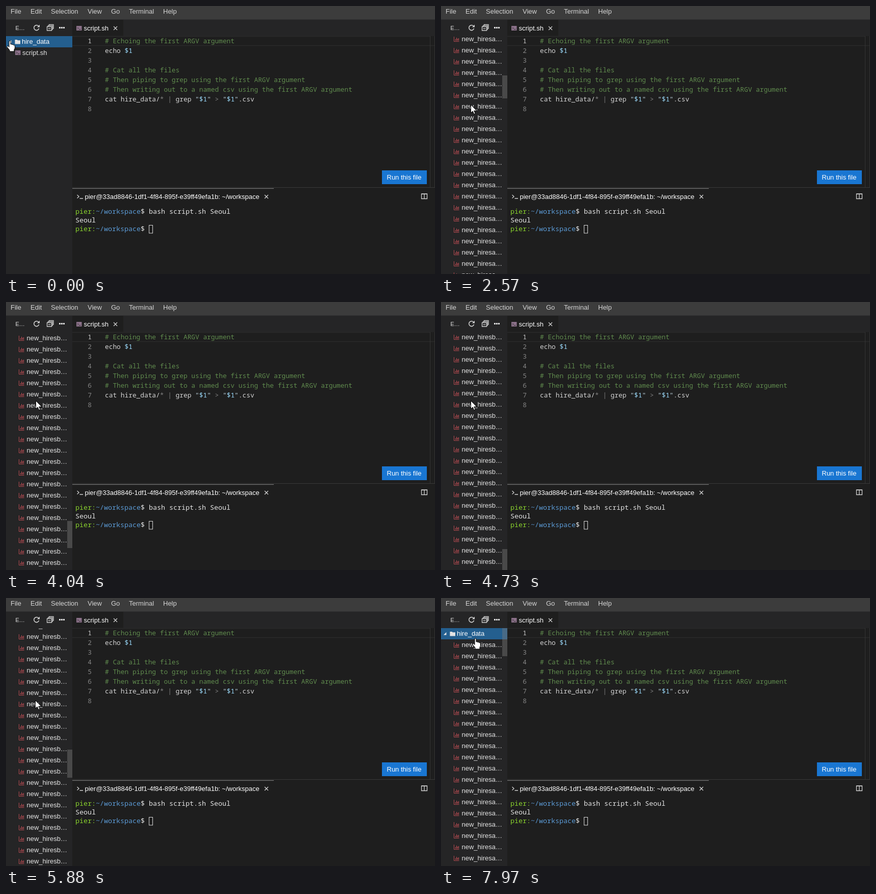
Write an HTML page that moves like this. It is 841x525 px and loops after 8 s.

```html
<!DOCTYPE html>
<html lang="en">
<head>
<meta charset="utf-8">
<title>Shell script workspace</title>
<style>
  html, body { margin: 0; width: 100%; height: 100%; overflow: hidden; background: #1e1e1e; }
  svg { display: block; }
  text { font: 13px "Liberation Sans", Arial, sans-serif; fill: #e4e4e4; white-space: pre;
         stroke: currentColor; stroke-width: 0; }
  .menu text { fill: #d4d4d4; }
  .code text { font: 12.83px "Noto Sans Mono", monospace; fill: #d4d4d4; }
  .code .num { fill: #858585; text-anchor: end; }
  .code .now { fill: #c6c6c6; }
  .code .note { fill: #608b4e; }
  .var { fill: #9cdcfe; }
  .str { fill: #b9cdd8; }
  .op { fill: #808080; }
  .term text { font: 13.333px "Noto Sans Mono", monospace; fill: #e5e5e5; }
  .user { fill: #8ad22e; }
  .path { fill: #5c9bd6; }
  .line { fill: none; stroke: #d0d0d0; stroke-width: 1.3; }
  .cursor { fill: #fff; stroke: #000; stroke-width: 1; stroke-linejoin: round; }
</style>
</head>
<body>
<svg width="841" height="525" viewBox="0 0 841 525">
  <defs>
    <clipPath id="pane"><rect y="59" width="130" height="466"/></clipPath>
    <g id="chart" fill="none" stroke="#b0494f">
      <path d="M.5 0V9.5H10.5"/>
      <path d="M3.5 5V8M5.5 2V8M7.5 4V8M9.5 3V8" stroke-width="1.2"/>
    </g>
    <g id="shell">
      <rect width="10.5" height="9" fill="#8b7189"/>
      <path d="M2 2.5L4 4.5 2 6.5M5 6.8H8.5" fill="none" stroke="#252526"/>
    </g>
    <path id="close" class="line" d="M-3.5 -3.5L3.5 3.5M3.5 -3.5L-3.5 3.5"/>
  </defs>

  <rect width="841" height="525" fill="#1e1e1e"/>
  <rect width="130" height="525" fill="#252526"/>
  <rect y="26" width="841" height="33" fill="#252526"/>
  <rect width="841" height="26.5" fill="#3c3c3c"/>
  <rect x="130" y="27" width="100" height="32" fill="#1e1e1e"/>

  <g class="menu">
    <text x="9" y="15">File</text><text x="48" y="15">Edit</text>
    <text x="88" y="15">Selection</text><text x="160" y="15">View</text>
    <text x="206" y="15">Go</text><text x="241" y="15">Terminal</text>
    <text x="308" y="15">Help</text>
  </g>

  <text x="18.5" y="47" style="font-size:11px">E…</text>
  <path class="line" style="stroke-width:1.6" d="M63.5 39.2A5 5 0 1 0 64.6 44"/>
  <path d="M61 41.5H66V36.5Z" fill="#d0d0d0"/>
  <path class="line" d="M80.5 40.5H89.5V48H80.5ZM82.5 40V38.3H91.2V46H90M84.5 38V36.3H93V44H92M82.5 44.3H87.5"/>
  <path d="M104 41h3v3h-3zM108 41h3v3h-3zM112 41h3v3h-3z" fill="#e0e0e0"/>

  <use href="#shell" x="138" y="39"/>
  <text x="152.5" y="48" style="fill:#fff">script.sh</text>
  <use href="#close" x="214.5" y="43.5"/>

  <path d="M130 59.5H831M130 77.5H841" stroke="#2a2a2a" stroke-width="1.5"/>
  <path d="M831.5 59V355M840.5 59V355" stroke="#343434"/>
  <g class="code" id="code"></g>
  <rect x="737" y="322" width="88" height="27" fill="#1976d2"/>
  <text x="746.5" y="340" style="fill:#fff">Run this file</text>

  <path d="M130 355.5H841" stroke="#393939"/>
  <path d="M130 357.5H525" stroke="#858585"/>
  <path class="line" d="M139.5 370L143 373.2 139.5 376.5M144.5 377H151"/>
  <text x="154.5" y="378" style="fill:#fff">pier@33ad8846-1df1-4f84-895f-e39ff49efa1b: ~/workspace</text>
  <use href="#close" x="510.5" y="373.5"/>
  <path class="line" d="M814.5 368H825.5V377.5H814.5ZM820 368V377.5M814.5 368.3H825.5"/>
  <g class="term">
    <text x="136" y="407"><tspan class="user">pier:</tspan><tspan class="path">~/workspace</tspan>$ bash script.sh Seoul</text>
    <text x="136" y="424">Seoul</text>
    <text x="136" y="441"><tspan class="user">pier:</tspan><tspan class="path">~/workspace</tspan>$</text>
    <rect x="280.5" y="429.5" width="7" height="15.5" fill="none" stroke="#d8d8d8"/>
  </g>

  <g clip-path="url(#pane)">
    <rect id="hover" width="130" height="22" fill="#2a2d2e"/>
    <g id="tree">
      <rect y="59" width="130" height="22" fill="#245f8f"/>
      <path d="M5 72.5H10.5V67Z" fill="#e8e8e8"/>
      <path d="M17.5 66H21.5L23 67.3H28V74.5H17.5Z" fill="#e4e4e4"/>
      <text x="31" y="74" style="fill:#fff">hire_data</text>
      <g id="files"></g>
      <g id="script"><use href="#shell" x="18" y="87"/><text x="32" y="96">script.sh</text></g>
    </g>
    <rect id="thumb" x="120" width="10" fill="#797979" fill-opacity=".42"/>
  </g>

  <path id="arrow" class="cursor" d="M.5 .5V16.5L4.2 13 6.7 18.8 9.2 17.8 6.8 12.2H12Z"/>
  <path id="hand" class="cursor" d="M5 1.5Q6.5 -.5 8 1.5V7.5Q9.8 6.2 11 8.3 12.7 7 14 9.2 15.7 8.5 16.5 10.5V15L15 18V21.5H6V19L1 12.7Q.5 10.3 2.7 10.5L5 13Z"/>
</svg>

<script>
const LOOP = 8000, START = 528, TICK = 77.4;
const ROW = 22, TOP = 59, VIEW = 476, FILES = 187, FIRST_B = 80;
const el = id => document.getElementById(id);
const move = (id, x, y) => el(id).setAttribute('transform', `translate(${x} ${y})`);
const show = (id, on) => el(id).setAttribute('visibility', on ? 'visible' : 'hidden');

const quoted = '<tspan class="str">"</tspan><tspan class="var">$1</tspan><tspan class="str">"</tspan>';
const op = s => `<tspan class="op">${s}</tspan>`;
const code = [
  '# Echoing the first ARGV argument',
  'echo <tspan class="var">$1</tspan>',
  '',
  '# Cat all the files',
  '# Then piping to grep using the first ARGV argument',
  '# Then writing out to a named csv using the first ARGV argument',
  `cat hire_data/${op('*')} ${op('|')} grep ${quoted} ${op('&gt;')} ${quoted}.csv`,
  ''
];
el('code').innerHTML = code.map((line, i) => {
  const y = 73 + 19 * i;
  return `<text class="num ${i ? '' : 'now'}" x="168" y="${y}">${i + 1}</text>` +
    `<text class="${line[0] === '#' ? 'note' : ''}" x="194" y="${y}">${line}</text>`;
}).join('');

el('files').innerHTML = Array.from({ length: FILES }, (_, i) =>
  `<use href="#chart" x="25" y="${87 + ROW * i}"/>` +
  `<text x="40.5" y="${96 + ROW * i}">new_hires${i < FIRST_B ? 'a' : 'b'}…</text>`).join('');

// Keys are [tick, value]; motion is linear between them.
const scrollKeys = [[16, 0], [17, 72], [19, 200], [22, 200], [34, 2058], [45, 3321],
  [54, 3675], [69, 2062], [79, 250], [81, 250], [84, 0]];
const thumbKeys = [[0, 41], [17, 42], [34, 48], [45, 53], [54, 55]];
const arrowX = [[9, 40], [13, 58], [59, 58], [60, 57], [90, 57], [93, 60]];
const arrowY = [[9, 139], [13, 193], [59, 193], [60, 200], [90, 200], [93, 68]];

function at(keys, k) {
  const i = keys.findIndex(key => key[0] > k);
  if (i === 0) return keys[0][1];
  if (i < 0) return keys[keys.length - 1][1];
  const [k0, v0] = keys[i - 1], [k1, v1] = keys[i];
  return Math.round(v0 + (v1 - v0) * (k - k0) / (k1 - k0));
}

function draw(now) {
  const k = Math.floor((now % LOOP - START) / TICK);
  const open = k >= 0, scroll = at(scrollKeys, k), height = at(thumbKeys, k);
  const x = at(arrowX, k), y = at(arrowY, k);

  show('files', open);
  move('script', 0, open ? FILES * ROW : 0);
  move('tree', 0, -scroll);

  show('thumb', k >= 2);
  el('thumb').setAttribute('height', height);
  el('thumb').setAttribute('y', TOP + Math.round(scroll * height / VIEW));

  const pointing = k < 7 || k >= 96;
  show('hand', pointing);
  show('arrow', !pointing);
  move('hand', k < 7 ? 1 : 61, k < 7 ? 67.5 : 78.5);
  move('arrow', x, y);

  show('hover', !pointing && scroll === 0);
  el('hover').setAttribute('y', TOP + ROW * Math.floor((y - TOP) / ROW));
  requestAnimationFrame(() => draw(performance.now() - began));
}
const began = performance.now();
draw(0);
</script>
</body>
</html>
```
